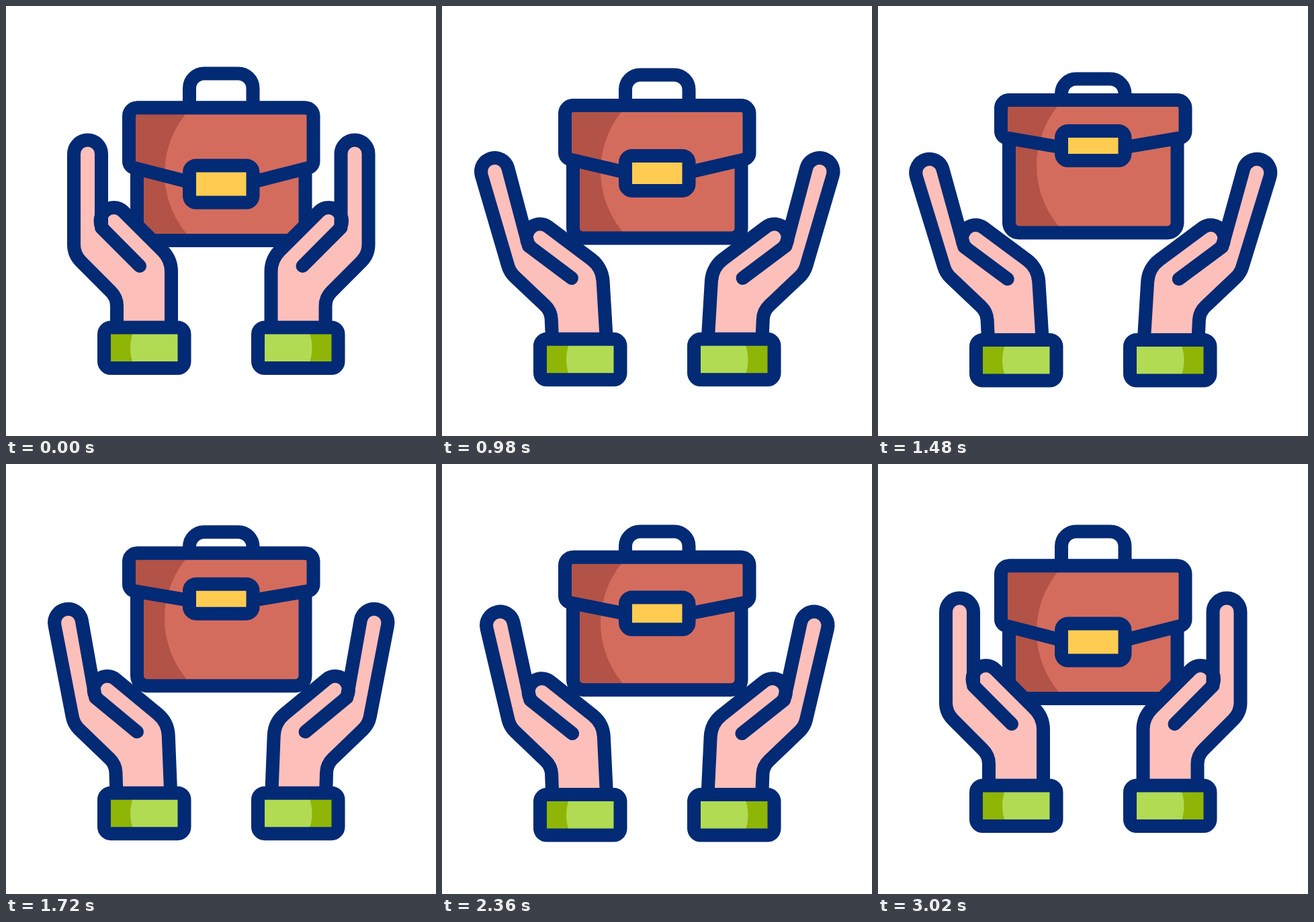
Write an HTML page with a canvas that moves like this. It is 640x640 px and loops after 3.28 s.

```html
<!DOCTYPE html>
<html lang="en">
<head>
<meta charset="utf-8">
<title>Briefcase in hands</title>
<style>
  html, body { margin: 0; width: 100%; height: 100%; overflow: hidden; background: #fff; }
  canvas { display: block; width: 100vw; height: 100vh; }
</style>
</head>
<body>
<canvas id="stage" width="640" height="640"></canvas>
<script>
const ctx = document.getElementById('stage').getContext('2d');
const LOOP = 3280;
const NAVY = '#032a75', SKIN = '#fdbfba', YELLOW = '#ffcc51';
const BROWN = ['#b35247', '#d46c5e'], GREEN = ['#8fb506', '#b1db53'];

// Turning points of the hands: time, bend, drop.
const swings = [
  [360, 0, 0], [650, -.3, -10.5], [1190, 1.28, 31], [1690, .5, 11],
  [2140, 1.28, 31], [2630, -.3, -10.5], [3020, 0, 0]
];

// Eased progress from 0 to 1 between two times.
function ease(t, from, to) {
  const u = Math.min(1, Math.max(0, (t - from) / (to - from)));
  return (1 - Math.cos(Math.PI * u)) / 2;
}

function pose(t) {
  let bend = 0, drop = 0;
  for (let i = 1; i < swings.length; i++) {
    const [t0, b0, d0] = swings[i - 1], [t1, b1, d1] = swings[i];
    const e = ease(t, t0, t1);
    bend += (b1 - b0) * e;
    drop += (d1 - d0) * e;
  }
  const tilt = ease(t, 860, 1200) - ease(t, 2100, 2750);
  const air = Math.min(1, Math.max(0, (t - 940) / 480));
  const hop = 96 * Math.sin(Math.PI * air) ** 2;
  const bag = Math.abs(drop) - 30 * tilt * (2 - tilt) - hop;
  return { bend, drop, tilt, bag };
}

// Counter-clockwise turn about a pivot.
function rotate([x, y], [px, py], a) {
  const c = Math.cos(a), s = Math.sin(a), dx = x - px, dy = y - py;
  return [px + dx * c + dy * s, py - dx * s + dy * c];
}

function paint(path, fill) {
  if (fill) {
    ctx.fillStyle = fill;
    ctx.fill(path);
  }
  ctx.stroke(path);
}

// Dark shape with a light disc inside it.
function paintShaded(path, [dark, light], x, y, r) {
  ctx.save();
  ctx.clip(path);
  ctx.fillStyle = dark;
  ctx.fillRect(0, 0, 640, 640);
  ctx.fillStyle = light;
  ctx.beginPath();
  ctx.arc(x, y, r, 0, 7);
  ctx.fill();
  ctx.restore();
  ctx.stroke(path);
}

function box(x, y, w, h, r) {
  const p = new Path2D();
  p.roundRect(x, y, w, h, r);
  return p;
}

function drawBag({ bag, tilt }) {
  ctx.save();
  ctx.translate(0, bag);
  const top = 151.5;

  const grip = new Path2D();
  const gripTop = top - 51 + 19.5 * tilt;
  grip.moveTo(273, top);
  grip.arcTo(273, gripTop, 320, gripTop, 22);
  grip.arcTo(367.5, gripTop, 367.5, top, 22);
  grip.lineTo(367.5, top);
  paint(grip);

  paintShaded(box(195, top, 250.5, 197.5, [0, 0, 15, 15]), BROWN, 376, 249, 140);

  const side = top + 87.5 - 32.5 * tilt, mid = top + 108.5 - 39.5 * tilt;
  const flap = new Path2D();
  flap.moveTo(320, top);
  flap.arcTo(457.5, top, 457.5, side, 12);
  flap.arcTo(457.5, side, 375, mid, 10);
  flap.lineTo(375, mid);
  flap.lineTo(265, mid);
  flap.arcTo(183, side, 183, top, 10);
  flap.arcTo(183, top, 320, top, 12);
  flap.closePath();
  paintShaded(flap, BROWN, 376, 249, 140);

  paint(box(273, top + 86 - 40 * tilt, 94.5, 55 - 11 * tilt, 10), YELLOW);
  ctx.restore();
}

function drawHand({ bend, drop }) {
  const rad = Math.PI / 180;
  const wristTurn = 5 * bend * rad, fingerTurn = 16.5 * bend * rad, thumbTurn = 5.5 * bend * rad;
  const palm = p => rotate(p, [206, 478], wristTurn);
  const finger = p => palm(rotate(p, [114, 340], fingerTurn));
  const thumb = p => palm(rotate(p, [205, 384], thumbTurn));
  const heel = palm([165, 434]), knuckle = finger([101, 370]), base = thumb([246, 377]);
  const wrist = [246, 500];

  ctx.save();
  ctx.translate(0, drop);
  const p = new Path2D();
  p.moveTo(165, 500);
  p.arcTo(...heel, ...knuckle, 30);
  p.arcTo(...knuckle, ...finger([101, 220]), 36);
  const a = wristTurn + fingerTurn, b = wristTurn + thumbTurn;
  p.arc(...finger([121.5, 220]), 20.5, Math.PI - a, 2 * Math.PI - a);
  p.lineTo(...thumb([142, 330]));
  p.lineTo(...palm([199, 387]));
  p.arc(...thumb([160.5, 320]), 20, Math.PI * .75 - b, Math.PI * 1.75 - b);
  p.arcTo(...base, ...wrist, 44);
  p.lineTo(...wrist);
  paint(p, SKIN);

  paintShaded(box(146, 478.5, 119.5, 60.5, 10), GREEN, 253, 509, 68);
  ctx.restore();
}

function draw(now) {
  const p = pose(now % LOOP);

  ctx.fillStyle = '#fff';
  ctx.fillRect(0, 0, 640, 640);
  ctx.strokeStyle = NAVY;
  ctx.lineWidth = 20;
  ctx.lineJoin = ctx.lineCap = 'round';

  drawBag(p);
  drawHand(p);
  ctx.save();
  ctx.translate(640.5, 0);
  ctx.scale(-1, 1);
  drawHand(p);
  ctx.restore();
}

let start;
function tick(now) {
  start ??= now;
  draw(now - start);
  requestAnimationFrame(tick);
}
draw(0);
requestAnimationFrame(tick);
</script>
</body>
</html>
```
